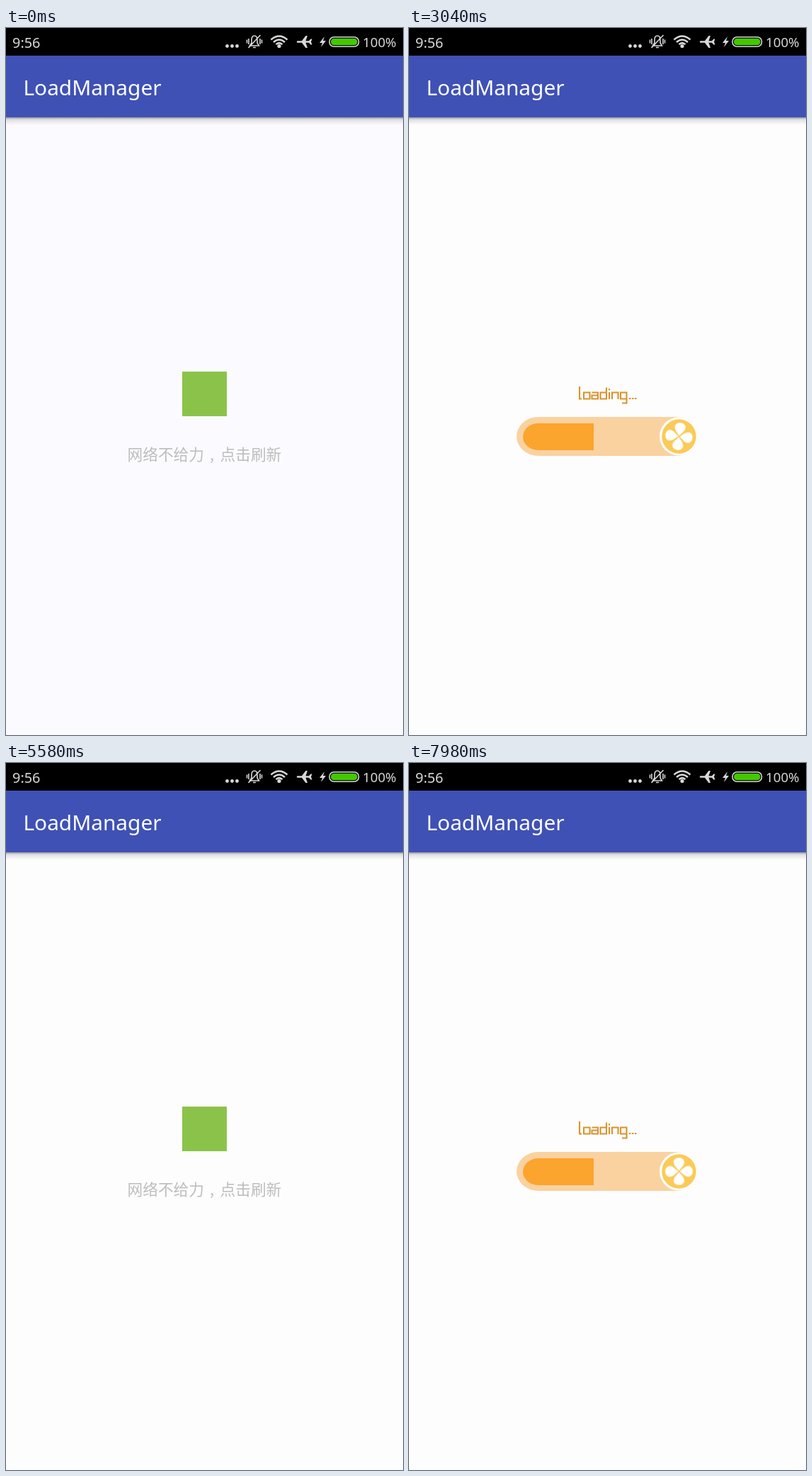
Recreate the animation shown at these times as an HTML page. Size 561 px wide and 998 px high, loop 8000 ms.

```html
<!DOCTYPE html>
<html lang="zh-CN">
<head>
<meta charset="utf-8">
<title>LoadManager</title>
<style>
  html, body { margin: 0; width: 100%; height: 100%; overflow: hidden; background: #fdfdfd; }
  svg { display: block; width: 100vw; height: 100vh; }
  text { font-family: "Noto Sans", "Open Sans", sans-serif; }
  .page, .error, .loader, .leaves { animation: 8s step-end infinite; }
  .page { animation-name: page; }
  .error { animation-name: error; }
  .loader { animation-name: loader; }
  .leaves { animation-name: leaves; }
  .bar { transform-origin: 161px 0; animation: fill 8s linear infinite; }
  .blades { animation: spin 8s linear infinite; }
  .leaf { opacity: 0; animation: drift 8s linear var(--at) infinite; }

  @keyframes page { 0% { fill: #fbfbff; } 16.125%, 100% { fill: #fdfdfd; } }
  @keyframes error {
    0%, 51.375% { opacity: 1; }
    13.375%, 75.125%, 100% { opacity: 0; }
  }
  @keyframes loader {
    0%, 51.375% { opacity: 0; }
    13.375%, 75.125%, 100% { opacity: 1; }
  }
  @keyframes leaves {
    0%, 51.375% { opacity: 0; }
    16.125%, 77.875%, 100% { opacity: 1; }
  }
  @keyframes fill {
    0%, 16.125%, 51.38%, 77.875% { transform: scaleX(0); }
    28.625%, 51.375%, 90.375%, 100% { transform: scaleX(1); }
  }
  @keyframes spin {
    0%, 16.125% { transform: rotate(69deg); }
    18.375% { transform: rotate(20deg); }
    25.5% { transform: rotate(-135deg); }
    38% { transform: rotate(-352deg); }
    51.375% { transform: rotate(-609deg); }
    51.38%, 77.875% { transform: rotate(122deg); }
    81.875% { transform: rotate(45deg); }
    99.75% { transform: rotate(-270deg); }
    100% { transform: rotate(-275deg); }
  }
  /* A leaf crosses the track in 820 ms while it turns. */
  @keyframes drift {
    0% { opacity: 1; transform: translate(355px, var(--y0)) rotate(var(--turn)); }
    10.25% { opacity: 1; transform: translate(161px, var(--y1)) rotate(calc(var(--turn) + 150deg)); }
    10.26%, 100% { opacity: 0; transform: translate(161px, var(--y1)); }
  }
</style>
</head>
<body>
<svg viewBox="0 0 561 998" preserveAspectRatio="none">
  <defs>
    <linearGradient id="shade" x2="0" y2="1">
      <stop offset="0" stop-color="#6f7488" stop-opacity=".8"/>
      <stop offset=".3" stop-color="#999" stop-opacity=".3"/>
      <stop offset="1" stop-color="#aaa" stop-opacity="0"/>
    </linearGradient>
    <clipPath id="tube"><rect x="161" y="558" width="230" height="38" rx="22" ry="19"/></clipPath>
    <path id="petal" d="M0-1C-4-6-8-9-7.5-14C-6.5-21 6.5-21 7.5-14C8-9 4-6 0-1Z"/>
    <path id="leafShape" d="M-8 1L-5 0C-3-5 3-5.5 7.5 0C3 5 -3 5 -5 1.2L-8 2Z"/>
  </defs>

  <rect class="page" width="561" height="998" fill="#fdfdfd"/>
  <rect y="126" width="561" height="11" fill="url(#shade)"/>
  <rect y="39" width="561" height="87" fill="#3f51b5"/>
  <rect width="561" height="39"/>
  <text x="24.5" y="95" font-size="29.8" fill="#fff">LoadManager</text>

  <g fill="#d8d8d8">
    <text x="9" y="28" font-size="19.9">9:56</text>
    <text x="504" y="27" font-size="18.7">100%</text>
    <circle cx="312.5" cy="25.5" r="2.4"/>
    <circle cx="319.5" cy="25.5" r="2.4"/>
    <circle cx="326.5" cy="25.5" r="2.4"/>
    <path d="M450 12L443 21H447L445 27L452 18H448Z"/>
    <path d="M411.500 18.300Q410 19.500 411.500 20.700H418L423.500 28H426L423.500 20.700H428L430.500 23.500H432.500L431 19.500L432.500 15.500H430.500L428 18.300H423.500L426 11H423.500L418 18.300Z"/>
    <circle cx="386" cy="25.500" r="2.600"/>
  </g>
  <g fill="none" stroke="#d8d8d8" stroke-width="1.6">
    <path d="M344.500 25H357.500L355 21V17C355 9 347 9 347 17V21ZM349 27.500H353M342.500 28L359.500 10M343 15V23M340.500 16.500V21.500M359 15V23M361.500 16.500V21.500"/>
    <path d="M374.500 16.500Q386 6.500 397.500 16.500M378 20Q386 13 394 20M381.500 23.200Q386 19 390.500 23.200" stroke-width="2.500"/>
    <rect x="457" y="12.700" width="41.500" height="13.600" rx="6.500"/>
  </g>
  <rect x="459" y="14.700" width="37.500" height="9.600" rx="4.600" fill="#43c800"/>

  <g class="error">
    <rect x="249" y="485" width="63" height="63" fill="#8bc34a"/>
    <text y="610" font-size="21.7" fill="#bdbdbf" style="font-family:'Noto Sans CJK SC','Noto Sans CJK',sans-serif">
      <tspan x="171.500">网络不给力</tspan><tspan x="288">,</tspan><tspan x="302.500">点击刷新</tspan>
    </text>
  </g>

  <g class="loader">
    <path aria-label="loading..." fill="none" stroke="#d8942c" stroke-width="2.1"
      d="M241 506V523.500H244M247 514.500H255.500V523.500H247ZM258.500 514.500H267V523.500H258.500V518.500H267M279 507.500V523.500H270.500V514.500H279M283 514V524M283 509V511.500M287 524V514.500H295.500V524M307.500 523.500H299V514.500H307.500V529.500H301M311 523H313.500M315 523H317.500M319 523H321.500"/>
    <rect x="152" y="549" width="256" height="55" rx="31" ry="27.500" fill="#fad2a0"/>
    <g clip-path="url(#tube)"><rect class="bar" x="161" y="558" width="100" height="38" fill="#fba42e"/></g>
    <g class="leaves" fill="#fba00f">
      <use class="leaf" href="#leafShape" style="--at:1.449s;--y0:563px;--y1:590px;--turn:-20deg"/>
      <use class="leaf" href="#leafShape" style="--at:1.589s;--y0:582px;--y1:564px;--turn:-61deg"/>
      <use class="leaf" href="#leafShape" style="--at:1.833s;--y0:586px;--y1:572px;--turn:-57deg"/>
      <use class="leaf" href="#leafShape" style="--at:5.989s;--y0:581px;--y1:591px;--turn:-133deg"/>
      <use class="leaf" href="#leafShape" style="--at:6.461s;--y0:580px;--y1:567px;--turn:-47deg"/>
    </g>
    <circle cx="381" cy="576.500" r="27" fill="#fff"/>
    <circle cx="381.500" cy="576.500" r="24.200" fill="#fbca57"/>
    <g transform="translate(381.500 576.500)">
      <g class="blades" fill="#fff">
        <use href="#petal"/>
        <use href="#petal" transform="rotate(90)"/>
        <use href="#petal" transform="rotate(180)"/>
        <use href="#petal" transform="rotate(270)"/>
      </g>
    </g>
  </g>
</svg>
</body>
</html>
```
